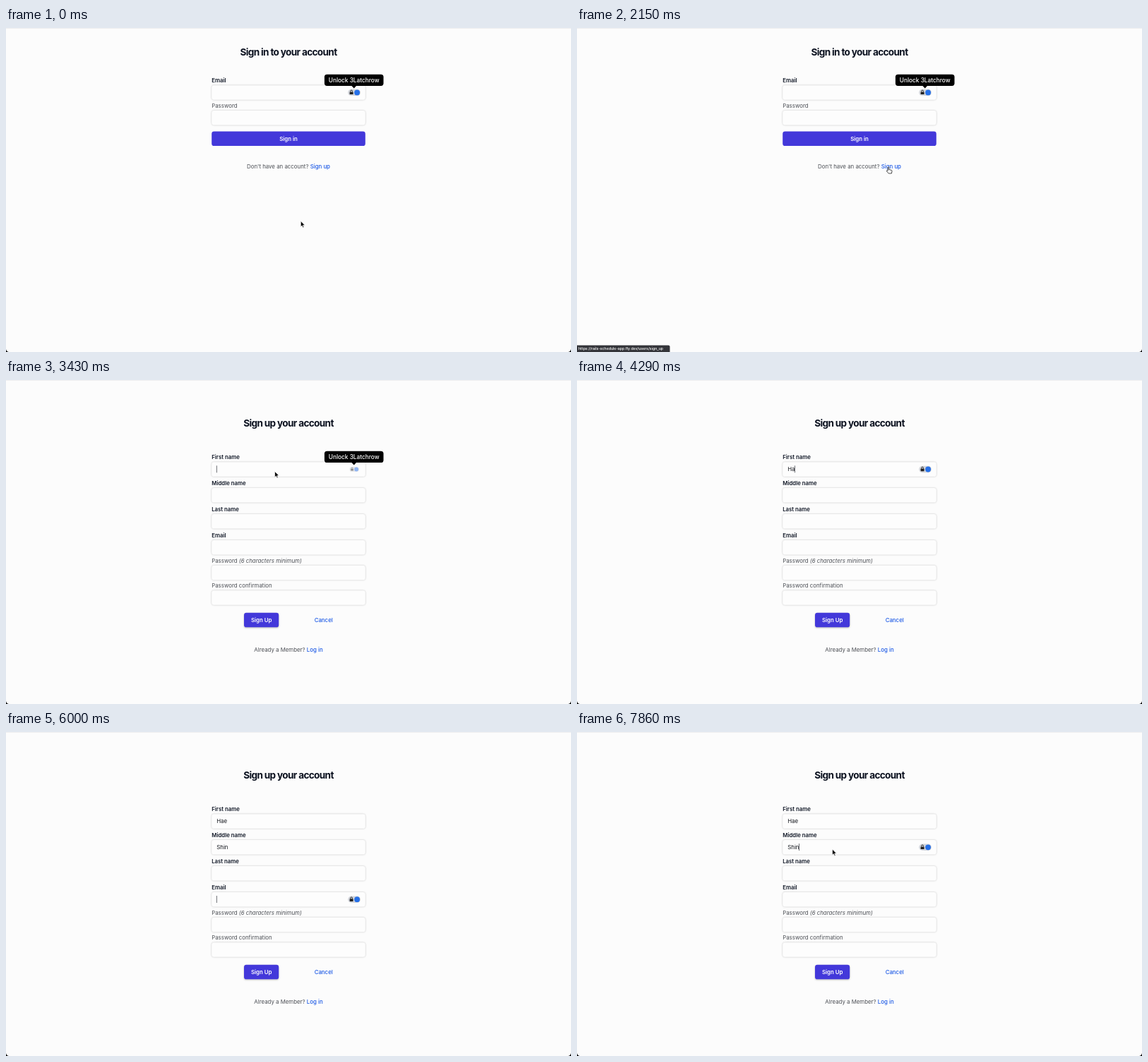
Write an HTML page that moves like this. It is 800 px wide and 459 px high and loops after 8 s.

```html
<!DOCTYPE html>
<html>
<head>
<meta charset="utf-8">
<style>
html, body { margin: 0; width: 100%; height: 100%; overflow: hidden; background: #fcfcfc; }
svg { display: block; width: 800px; height: 459px; }
text { font: 400 7.87px Inter, sans-serif; fill: #4d5056; white-space: pre; }
.title { font-weight: 700; font-size: 13.6px; letter-spacing: -.049em; fill: #0c1220; text-anchor: middle; }
.label { font-weight: 600; font-size: 7.8px; fill: #111827; }
.value { fill: #14171d; }
.mid { text-anchor: middle; }
.link { font-weight: 500; fill: #1d5ae6; }
.button { font-weight: 600; fill: #fff; text-anchor: middle; }
.tip { font-size: 8.3px; font-weight: 500; fill: #fff; text-anchor: middle; }
.status { font-size: 5.2px; font-weight: 500; fill: #fff; }
.field { fill: #fdfdfd; filter: drop-shadow(0 .8px .9px #0000003d); }
.solid { fill: #4338da; }
.raised { filter: drop-shadow(0 1px 1.2px #00000040); }
</style>
</head>
<body>
<svg id="stage" viewBox="0 0 800 459">
  <rect width="800" height="459" fill="#fcfcfc"/>
  <rect width="800" height="1" fill="#eeeeef"/>
  <g id="signIn"></g>
  <g id="signUp"></g>
  <rect id="caret" width=".8" height="10" fill="#4a4d54"/>
  <g id="badge">
    <rect x="-8.8" y="-4.7" width="17.8" height="9.4" rx="4.7" fill="#d3d6dc"/>
    <rect x="-6.4" y="-.9" width="5" height="3.6" rx=".6" fill="#222"/>
    <path d="M-5.3-.9v-1a1.4 1.4 0 0 1 2.8 0v1" fill="none" stroke="#222" stroke-width=".9"/>
    <circle cx="4.1" r="3.9" fill="#2670e8"/>
  </g>
  <g id="tip">
    <rect x="450.9" y="-25.7" width="83.6" height="16.2" rx="3.6"/>
    <path d="M489-10h7.4l-3.7 4z"/>
    <text class="tip" x="492.7" y="-14.7">Unlock 3Latchrow</text>
  </g>
  <path d="M0 454.5V459H4.5A4.5 4.5 0 0 1 0 454.5M800 454.5V459H795.5A4.5 4.5 0 0 0 800 454.5"/>
  <g id="status">
    <path d="M0 449.6h129.5a2 2 0 0 1 2 2V459H0z" fill="#34353a"/>
    <text class="status" x="2" y="456.2">https://rails-schedule-app.fly.dev/users/sign_up</text>
  </g>
  <path id="arrow" d="M0 0v8.2l1.9-1.7 1.3 2.9 1.4-.6-1.3-2.8h2.6z" stroke="#fff" stroke-width=".7"/>
  <path id="hand" d="M-.8 5.2V.6a.8.8 0 0 1 1.6 0v3l3.4.8q1 .3.8 1.5l-.6 3.1h-4.2l-2.8-3.2q-.3-1 .8-.9z" fill="#fff" stroke="#000" stroke-width=".7"/>
  <path id="beam" d="M-1.7-4.2Q0-4.2 0-3V3Q0 4.2-1.7 4.2M1.7-4.2Q0-4.2 0-3V3Q0 4.2 1.7 4.2M-1 1h2" fill="none" stroke="#222" stroke-width=".9"/>
</svg>
<script>
const $ = id => document.getElementById(id);
const text = (cls, x, y, s) => `<text class="${cls}" x="${x}" y="${y}">${s}</text>`;
const box = (cls, x, y, w, h = 20.5) =>
  `<rect class="${cls}" x="${x}" y="${y}" width="${w}" height="${h}" rx="3.4"/>`;
const field = y => box('field', 291.2, y - 10.2, 217.6);

const FIRST = 126.5, MIDDLE = 163.3, LAST = 200.3, EMAIL = 237.2, LOGIN = 91.4;

$('signIn').innerHTML =
  text('title', 400, 38.5, 'Sign in to your account') +
  text('label', 291.2, 77, 'Email') + field(LOGIN) +
  text('', 291.2, 113.2, 'Password') + field(127.2) +
  box('solid', 291.2, 146.6, 217.6) + text('button', 400, 159.8, 'Sign in') +
  text('mid', 400, 199.2, 'Don\'t have an account? <tspan class="link">Sign up</tspan>');

$('signUp').innerHTML =
  text('title', 400, 66.4, 'Sign up your account') +
  [['First name', FIRST], ['Middle name', MIDDLE], ['Last name', LAST], ['Email', EMAIL]]
    .map(([s, y]) => text('label', 291.2, y - 14.6, s) + field(y)).join('') +
  text('', 291.2, 259, 'Password <tspan font-style="italic">(6 characters minimum)</tspan>') + field(273) +
  text('', 291.2, 294.3, 'Password confirmation') + field(308.4) +
  box('solid raised', 337, 329.8, 49.2) + text('button', 361.7, 343.2, 'Sign Up') +
  text('mid link', 449.7, 343.2, 'Cancel') +
  text('mid', 400, 384.9, 'Already a Member? <tspan class="link">Log in</tspan>') +
  '<text id="first" class="value" x="298.2" y="129.3"/><text id="middle" class="value" x="298.2" y="166.1"/>';

// Pointer path: time, x, y
const path = [
  [150, 417.3, 273.5], [1000, 436, 212], [1430, 440.3, 203], [1720, 441, 197], [2290, 441, 197],
  [2570, 443, 199], [2720, 441, 196], [3430, 380.6, 129.5], [7000, 380.6, 129.5], [7570, 361.5, 166]
];
// Focused field: time, y
const focus = [[0, LOGIN], [2430, EMAIL], [3290, FIRST], [4720, MIDDLE], [5570, LAST], [5860, EMAIL], [7570, MIDDLE]];
const caretOff = [[0, 290], [860, 1290], [1860, 2430], [3720, 4010], [6570, 7000]];

const within = (t, a, b) => t >= a && t < b;
const show = (id, on) => $(id).style.display = on ? '' : 'none';
const place = (id, x, y, k = 1) => $(id).setAttribute('transform', `translate(${x} ${y}) scale(${k})`);
const typed = (s, times, t) => s.slice(0, times.filter(k => t >= k).length);

function pointer(t) {
  const i = path.findIndex(p => p[0] > t);
  if (i < 0) return path.at(-1).slice(1);
  if (!i) return path[0].slice(1);
  const [a, b] = [path[i - 1], path[i]];
  const u = (t - a[0]) / (b[0] - a[0]);
  return [a[1] + (b[1] - a[1]) * u, a[2] + (b[2] - a[2]) * u];
}

function draw(t) {
  const signUp = t >= 2430;
  const y = focus.findLast(f => t >= f[0])[1];
  show('signIn', !signUp);
  show('signUp', signUp);
  $('first').textContent = typed('Hae', [4150, 4290, 4430], t);
  $('middle').textContent = typed('Shin', [5000, 5150, 5290, 5430], t);

  const value = y === FIRST ? $('first') : y === MIDDLE ? $('middle') : null;
  const width = value && value.textContent ? value.getComputedTextLength() : 0;
  show('caret', !caretOff.some(([a, b]) => within(t, a, b)));
  place('caret', 297.9 + width, y - 5.2);

  const fresh = within(t, 3430, 3570);
  show('badge', !within(t, 2430, 3430));
  place('badge', 493, y, fresh ? .76 : 1);
  $('badge').style.opacity = fresh ? .5 : 1;
  show('tip', t < 2430 || within(t, 3430, 4150));
  place('tip', 0, y);
  show('status', within(t, 1720, 2860));

  const kind = within(t, 4150, 7000) ? '' : within(t, 1720, 2430) ? 'hand' : within(t, 2430, 3290) ? 'beam' : 'arrow';
  for (const id of ['arrow', 'hand', 'beam']) show(id, id === kind);
  if (kind) place(kind, ...pointer(t));
}

function tick(now) {
  const n = Math.floor((now % 8000 + 2) * 7 / 1000) % 56;
  draw(Math.ceil(n * 1000 / 70) * 10);
  requestAnimationFrame(tick);
}
requestAnimationFrame(tick);
</script>
</body>
</html>
```
